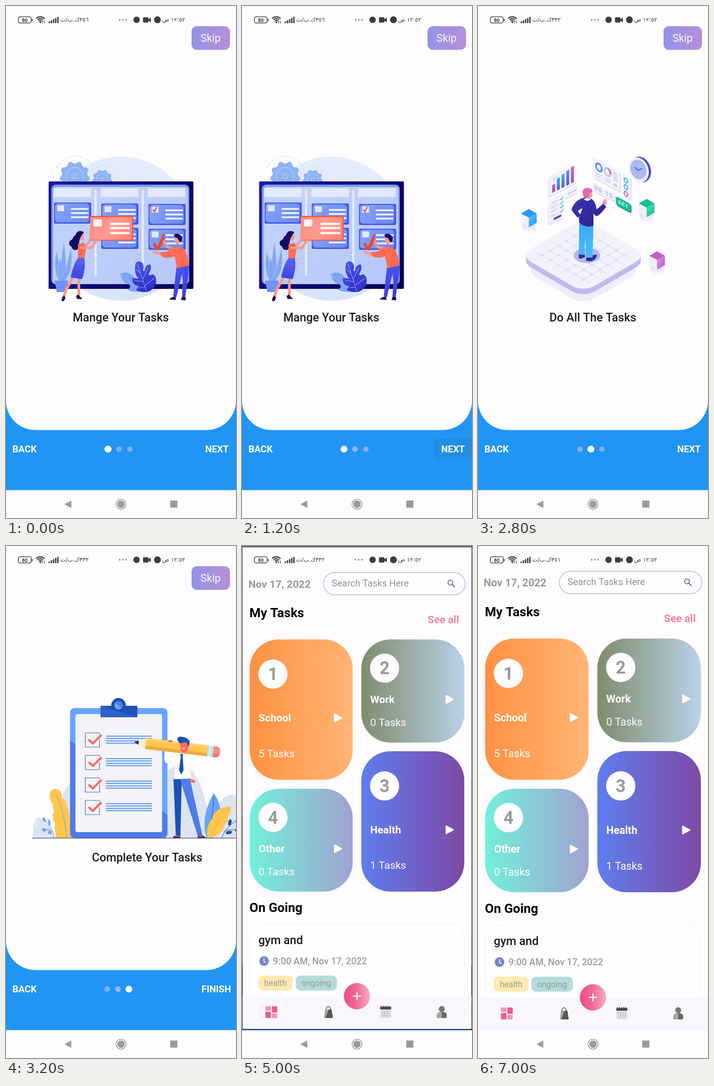
Recreate the animation shown at these times as an HTML page with a canvas. Size 502 px wide and 1115 px high, loop 7.1 s.

```html
<!DOCTYPE html>
<html lang="en">
<head>
<meta charset="utf-8">
<title>Task planner</title>
<style>
html, body { margin: 0; width: 502px; height: 1115px; overflow: hidden; background: #fefcff; }
canvas { display: block; width: 502px; height: 1115px; }
</style>
</head>
<body>
<canvas id="stage"></canvas>
<script>
const W = 502, H = 1115, FOOT = 1054.5, LOOP = 7100, BG = '#fefcff', BLUE = '#2095f4';
const cv = document.getElementById('stage'), c = cv.getContext('2d');
const dpr = window.devicePixelRatio || 1;
cv.width = W * dpr;
cv.height = H * dpr;

// ---------- helpers ----------
const clamp = v => Math.max(0, Math.min(1, v));
const ramp = (t, a, b) => clamp((t - a) / (b - a));
function bezier(x1, y1, x2, y2) {
  const at = (a, b, u) => 3 * a * u * (1 - u) ** 2 + 3 * b * u * u * (1 - u) + u ** 3;
  return x => {
    if (x <= 0) return 0;
    if (x >= 1) return 1;
    let lo = 0, hi = 1;
    for (let i = 0; i < 24; i++) {
      const m = (lo + hi) / 2;
      if (at(x1, x2, m) < x) lo = m; else hi = m;
    }
    return at(y1, y2, lo);
  };
}
function grad(x0, y0, x1, y1, ...cols) {
  const g = c.createLinearGradient(x0, y0, x1, y1);
  cols.forEach((k, i) => g.addColorStop(i / (cols.length - 1), k));
  return g;
}
function paint(p, fill, line, w) {
  if (fill) { c.fillStyle = fill; c.fill(p); }
  if (line) { c.strokeStyle = line; c.lineWidth = w || 1; c.stroke(p); }
}
const path = (d, fill, line, w) => paint(new Path2D(d), fill, line, w);
function box(x, y, w, h, r, fill, line, lw) {
  const p = new Path2D();
  p.roundRect(x, y, w, h, r);
  paint(p, fill, line, lw);
}
function oval(x, y, rx, ry, fill, line, w, rot = 0) {
  const p = new Path2D();
  p.ellipse(x, y, rx, ry, rot, 0, 7);
  paint(p, fill, line, w);
}
const disc = (x, y, r, fill, line, w) => oval(x, y, r, r, fill, line, w);
function text(s, x, y, size, weight, color, align = 'left') {
  c.font = `${weight} ${size}px Roboto, sans-serif`;
  c.textAlign = align;
  c.fillStyle = color;
  c.fillText(s, x, y);
}
function within(m, draw) {
  c.save();
  c.transform(...m);
  draw();
  c.restore();
}
function each(list, draw) { list.forEach((a, i) => draw(...[].concat(a), i)); }

// ---------- page 1: board ----------
function gear(x, y, r, n) {
  c.save();
  c.setLineDash([5, 4]);
  c.strokeStyle = '#d3e0f9';
  c.lineWidth = 2;
  c.beginPath();
  c.arc(x, y, r * 1.33, -2.7, .1);
  c.stroke();
  c.restore();
  c.beginPath();
  for (let i = 0; i < 4 * n; i++) {
    const a = (i + .5) / (4 * n) * Math.PI * 2, q = i % 4 < 2 ? r : r * .85;
    c.lineTo(x + q * Math.cos(a), y + q * Math.sin(a));
  }
  c.fillStyle = '#8fb2f5';
  c.fill();
  disc(x, y, r * .58, null, '#bdd2fa', 1.2);
  disc(x, y, r * .16, '#8fb2f5', '#bdd2fa', 1.2);
}
function ticket(x, y) {
  box(x, y, 81, 46, 3, '#4456ec');
  box(x + 2, y + 2, 75, 41, 7, grad(x, y, x + 75, y + 41, '#86a2f7', '#6c8bf3'));
  box(x + 7, y + 6, 15, 13, 0, '#dfe8fd');
  for (let i = 0; i < 3; i++) box(x + 37, y + 12 + i * 9, 38, 4, 0, '#e9effe');
}
function boardPage() {
  const skin = '#ff9687', red = '#ff6b55', navy = '#120c66', leaf = '#7fa1f3';
  disc(251, 485, 157, grad(251, 328, 251, 642, '#e5edfb', '#d8e4fb'));
  c.save();
  c.beginPath();
  c.rect(93, 320, 316, 64);
  c.clip();
  gear(150, 371, 33, 9);
  gear(210, 378, 22, 9);
  c.restore();
  box(93, 382, 316, 234, 2, grad(93, 382, 409, 616, '#211a9c', '#0f0875', '#06034f'));
  box(99, 389, 301, 217, 9, '#7b9df3');
  box(103, 394, 294, 211, 7, grad(103, 394, 396, 605, '#c3d3fa', '#b6c8f8'));
  each([104, 207, 309], x => box(x, 397, 82, 19, 0, '#e2eafc'));
  each([193, 296], x => box(x, 400, 5, 187, 0, '#e2eafc'));
  each([[105, 428], [208, 430], [208, 483], [311, 431], [311, 485]], ticket);
  path('M320 443L324 448L329 438', null, '#e8492f', 2.5);

  // potted plant
  each([[110, 535], [126, 514], [118, 550], [141, 528], [139, 562]], (x, y) =>
    path(`M${x} ${y}Q${x - 8} 575 117 602H126Q${x + 9} 570 ${x} ${y}`, '#80a5f4', '#a9c3f8', .7));
  path('M106 598H136L130 623H111Z', '#7094f2');

  // coral card
  box(184, 457, 94, 54, 2, '#f25c4b');
  box(184, 460, 91, 49, 2, grad(184, 458, 275, 510, '#ff8c80', '#ff9b8f', '#ff7f71'));
  box(191, 465, 18, 15, 0, '#fff6f5');
  each([472, 481, 492], y => box(227, y, 43, 5, 0, '#fff3f1'));

  // woman
  c.lineCap = c.lineJoin = 'round';
  path('M147 590L131 618L126 634M159 592V632', null, skin, 6);
  path('M172 525L184 510L185 484', null, skin, 4.5);
  oval(165, 502, 5, 9, skin);
  path('M170 493C164 487 153 490 152 499C146 501 147 507 143 509C136 512 136 521 143 524C144 531 153 534 157 529C161 524 158 518 160 513C161 508 162 502 170 493Z', navy);
  path('M157 519L170 515L175 527L171 551H157Z', red);
  path('M164 526L187 527L198 509', null, skin, 5.5);
  path('M157 549H171Q175 570 166 595L141 591Q147 562 157 549Z', grad(157, 549, 157, 595, '#5a64f2', '#3d43de'));
  path('M121 642Q122 633 127 631L130 636L126 643ZM153 632L157 628L167 638H160L155 638Z', navy);

  // leaves
  path('M249 584Q262 576 276 586L284 600L300 622Q272 624 266 617Q275 612 268 606Q255 604 249 584Z', leaf);
  path('M250 585L290 618', null, '#b4c8fa', 1);
  path('M283 560Q290 552 298 560Q302 566 299 576L302 578Q304 562 315 563Q319 572 311 584L314 587Q322 580 327 592Q330 606 321 615Q314 622 310 622Q294 625 284 618L290 610Q274 608 276 592L290 594Q278 582 283 560Z', grad(285, 555, 315, 622, '#4c55ee', '#2e2cc4'));
  path('M287 562L306 620M294 582L284 574M299 600L281 598M303 612L290 614M299 594L310 570M304 608L323 593', null, '#8fa6f8', 1.1);

  // man
  path('M366 529L352 525L345 513M338 541L323 535', null, skin, 5.5);
  path('M320 517Q327 513 330 525L343 496L347 498Q342 522 332 533Q325 530 320 517Z', '#e8492f');
  path('M372 569L400 565L397 595L391 634H384L386 597L384 583L372 634L365 632Z', grad(370, 566, 395, 634, '#4a54ee', '#3b3fd8'));
  oval(374, 510, 6.5, 9, skin);
  path('M366 499Q372 493 379 498Q387 502 384 511Q381 517 378 512L374 505Q369 505 366 499Z', navy);
  path('M361 528Q372 522 384 526Q394 530 400 565L373 571L368 545Q355 551 341 546L335 536Q350 538 361 528Z', red);
  path('M356 639Q362 632 370 633L371 640ZM382 640L384 634H392V641Z', navy);
}

// ---------- page 2: control room ----------
function slab(dy, half, r, fill, line) {
  within([1, .58, -1, .58, 230, 543 + dy], () => box(-half, -half, half * 2, half * 2, r, fill, line));
}
function panel(x, y, k, w, h, draw, face = '#f1f2fc', edge = '#d9dbf4') {
  within([1, k, 0, 1, x, y], () => {
    box(k > 0 ? 2 : -1, 2, w, h, 4, edge);
    box(0, 0, w, h, 4, face);
    draw();
  });
}
function wideText(s, x, y, size, color) {
  c.letterSpacing = '1.5px';
  text(s, x, y, size, 700, color, 'center');
  c.letterSpacing = '0px';
}
function cube(x, y, top, side) {
  box(x - 14, y + 8, 28, 28, 2, grad(0, y + 14, 0, y + 36, '#dddcf5', 'rgba(240,240,252,0)'));
  path(`M${x - 17} ${y - 10}L${x} ${y - 1}V${y + 20}L${x - 17} ${y + 10}Z`, '#f0effb');
  path(`M${x + 17} ${y - 10}L${x} ${y - 1}V${y + 20}L${x + 17} ${y + 10}Z`, grad(x, y, x + 17, y + 15, side, top));
  path(`M${x} ${y - 20}L${x + 17} ${y - 10}L${x} ${y - 1}L${x - 17} ${y - 10}Z`, top);
}
function roomPage() {
  const pink = '#d466ad', cyan = '#3aaef6', violet = '#6257cf', teal = '#19bd98', pale = '#c4c7ea';
  slab(34, 64, 24, '#eeedfb');
  for (let i = 12; i > 0; i--) slab(i, 69.5, 24, '#bebbef');
  slab(0, 69.5, 24, '#f2f2fc');
  within([1, .58, -1, .58, 230, 543], () => {
    for (let i = -2.5; i < 3; i++) {
      box(i * 18 - .6, -60, 1.2, 120, 0, '#e1e2f4');
      box(-60, i * 18 - .6, 120, 1.2, 0, '#e1e2f4');
      for (let j = -2.5; j < 3; j++) disc(i * 18, j * 18, 2.8, '#dcddf3');
    }
  });
  oval(238, 543, 29, 17, '#b7b7e8');

  panel(154, 372, -.5, 61, 44, () => {
    each([[17, pink], [26, cyan], [29, cyan], [32, '#5c8be9'], [35, pink]], (h, col, i) =>
      box(8 + i * 10.2, 39 - h, 6.5, h, 0, grad(0, 39 - h, 0, 39, col, i % 4 ? violet : '#8d5bc9')));
    box(9, 8, 10, 1.5, 0, pale);
    box(9, 12, 8, 1.5, 0, pale);
  });
  panel(154, 423, -.48, 34, 53, () => {
    for (let i = 0; i < 4; i++) {
      box(5, 9 + i * 9, 18, 1.5, 0, pale);
      box(5, 12 + i * 9, 12, 1, 0, pale);
      path(`M26 ${10 + i * 9}l2 2l4 -5`, null, teal, 1.5);
    }
    box(11, 44, 17, 5, 2, '#574bbd');
  });
  panel(192, 403, -.52, 26, 16, () => { for (let i = 0; i < 4; i++) disc(6 + i * 5, 9, 1.6, '#b1b4e2'); });
  panel(250, 327, .54, 60, 45, () => {
    oval(14, 17, 6.5, 8, null, '#7b77d5', 3.5);
    path('M14 9Q21 11 20 18Q19 24 14 25', null, cyan, 4);
    oval(33, 17, 6.5, 8, null, '#bfc0ea', 3.5);
    path('M33 9Q40 11 39 18', null, pink, 4);
    for (let i = 0; i < 5; i++) box(46, 10 + i * 4, 8, 1.5, 0, '#b8bbe3');
    each([6, 26], x => { box(x, 32, 15, 1.5, 0, pale); box(x, 37, 12, 1.5, 0, pale); });
    box(46, 34, 8, 5, 1, '#c8caed');
  });
  panel(250, 383, .53, 48, 18, () => wideText('08:15', 24.5, 13.5, 13, '#b2b5df'));
  panel(301, 414, .53, 32, 18, () => wideText('SET', 16.5, 13, 10.5, '#e5fff7'), '#18c096', '#0f9d7c');
  panel(315, 363, .5, 18, 50, () =>
    each([teal, cyan, '#b15bc6'], (col, i) => oval(8, 13 + i * 14.5, 4, 5, '#e1e5f9', col, 2)));

  oval(357, 356, 22, 30, '#e3e4f8', null, 0, -.35);
  oval(355, 356, 21.5, 28.5, '#4a3fc0', null, 0, -.35);
  oval(351, 357, 21, 28, '#eceefb', null, 0, -.35);
  oval(350, 356, 17, 22, '#b0b8ef', null, 0, -.35);
  for (let i = 0; i < 12; i++) disc(350 + 13 * Math.cos(i * .5236), 356 + 17 * Math.sin(i * .5236), .8, '#7f87d2');
  path('M342 351L349 358L358 354', null, '#168fd8', 2.5);

  cube(111, 462, '#2699f1', '#55b9fa');
  cube(368, 440, '#15bd93', '#40dcb5');
  cube(391, 554, '#c45fc5', '#dc86d9');

  // man
  path('M220 541L232 538L234 546Q226 552 220 549ZM236 548L250 543L259 541Q260 552 246 556L236 555Z', '#352a9d');
  path('M221 470Q237 485 252 476L250 548H236L234 505L232 542L220 541Z', grad(220, 475, 252, 545, '#38a8f5', '#4abdfb'));
  path('M270 433Q273 423 277 420L280 421L281 430L276 436Z', '#f59b9f');
  path('M222 421Q233 414 246 419Q256 424 259 443L273 431L280 437Q266 456 258 458L252 452V478Q237 485 221 472L220 462L228 440L218 446L224 456L218 461Q207 450 204 443Q210 427 222 421Z', grad(205, 420, 260, 480, '#4035b5', '#2c218f'));
  path('M234 413H247V421Q240 425 234 419Z', '#f3a0ad');
  oval(245, 410, 5, 8, '#f5a0a4');
  path('M228 405Q229 396 239 396Q250 397 250 404L244 407L241 416Q236 420 232 417Q229 413 228 405Z', grad(228, 398, 248, 418, '#ee6e9e', '#c969c3'));
  path('M230 421Q238 417 246 421L239 425Z', '#eef0ff');
}

// ---------- page 3: checklist ----------
function sprig(x, s, col) {
  within([s, 0, 0, 1, x, 636], () => {
    path('M0 0Q8 -24 36 -40M6 -14Q16 -20 34 -18', null, '#25458f', 1);
    each([[36, -40, -.7], [18, -34, -1.3], [36, -18, -.2], [16, -12, -.2]], (a, b, r) => oval(a, b, 7, 3.6, col, null, 0, r));
  });
}
function listPage() {
  const hill = '#dce4f0', navy = '#1b51b4', mid = '#4f7ce8', sky = '#68a5ff', gold = '#ffc64f', coral = '#ff6b63';
  path('M0 636Q2 591 14 591Q24 592 30 605Q38 608 47 636ZM50 636Q60 520 88 515V636ZM284 636V500Q310 470 340 480Q370 510 378 560Q390 580 394 600Q408 542 436 541Q456 541 465 575Q470 598 482 610L500 636Z', hill);
  sprig(48, -.62, sky);
  path('M52 636Q47 612 50 604Q40 590 48 577Q42 568 46 564Q36 554 38 538Q42 524 59 532Q66 538 64 548Q76 556 75 566Q80 572 79 582L88 596V636Z', gold);
  path('M51 540Q68 570 75 634', null, '#75a5dd', 1.2);

  // clipboard
  c.save();
  c.beginPath();
  c.roundRect(82, 353, 213, 283, 10);
  c.clip();
  box(82, 353, 213, 283, 0, sky);
  path('M82 423L295 586V636H82Z', mid);
  c.restore();
  box(94, 366, 189, 257, 4, '#f4f3f8');
  disc(188, 347, 16, navy);
  box(149, 348, 80, 25, 0, navy);
  path('M149 348L229 373H149Z', '#2a62c5');
  disc(188, 347, 9.2, sky);
  path('M181.5 340.5A9.2 9.2 0 0 1 194.5 353.5Z', mid);
  c.lineCap = 'butt';
  c.lineJoin = 'miter';
  for (let i = 0; i < 4; i++) {
    const y = 407 + i * 49;
    box(115.5, y, 31, 31, 0, null, '#2c5fae', 1.2);
    for (let j = 0; j < 4; j++) box(160, y + 6 + j * 5.1, 101, 2.2, 1, '#5b98ee');
    path(`M123 ${y + 15}L132 ${y + 23}L151 ${y + 4}`, null, '#f4f3f8', 9);
    path(`M122.5 ${y + 14.5}L132 ${y + 23}L151 ${y + 4}`, null, coral, 4.8);
  }

  // man
  path('M308 507H326L323 631H313Z', navy);
  path('M322 507H344L371 630L361 632Z', mid);
  path('M306 636Q309 630 323 631V636ZM360 636L362 630L370 629L380 636Z', '#24336b');
  path('M306 633Q310 629 322 631V633ZM362 631L370 629L374 632L364 634Z', '#d94e55');
  path('M344 497L345 507L355 511Q358 515 351 516L344 513L340 503Z', coral);
  path('M289 447L300 448L299 460L312 452Q327 445 338 455L345 492L346 506L309 508L312 470L292 473Q286 470 289 447Z', '#fff');
  path('M312 470L309 507M299 460L306 457', null, '#dfe5f0', 1);
  path('M322 453H329L328 458L330 488L325 498L320 488L324 458Z', navy);

  // pencil
  const a = .118;
  within([Math.cos(a), Math.sin(a), -Math.sin(a), Math.cos(a), 222, 427], () => {
    path('M0 0L27 -12V12Z', '#fbeccb');
    path('M0 0L10 -4.5V4.5Z', '#252b56');
    box(26, -12, 136, 24, 0, gold);
    box(26, 5, 136, 7, 0, '#eda943');
    box(26, -12, 136, 5, 0, '#ffd36b');
    box(161, -12, 14, 24, 0, '#bfe0f0');
    box(165, -12, 3, 24, 0, '#dceff8');
    box(174, -12, 15, 24, [0, 9, 9, 0], '#f98c7c');
    box(174, 4, 14, 8, [0, 0, 8, 0], '#ec786c');
  });
  oval(301, 425, 5, 2.5, coral);
  path('M321 427Q331 420 342 426L340 443Q332 456 324 445Z', coral);
  path('M317 424Q314 416 323 415Q337 416 342 423Q345 430 340 437L337 428Q327 427 323 431Z', navy);
  path('M325 439Q331 442 334 438Q331 446 325 439Z', '#fff');

  // plants
  path('M380 636Q366 590 396 538Q418 570 408 606L394 636Z', sky);
  path('M396 545Q394 590 384 632', null, navy, 1);
  path('M382 636Q378 610 392 594Q396 570 433 567Q434 580 427 590Q428 602 418 608Q418 622 404 628Q398 636 382 636Z', gold);
  path('M430 571Q402 600 388 634', null, '#e3a43c', 1);
  sprig(413, 1, navy);
  box(0, 635.5, W, 1.2, 0, '#3c466f');
}

// ---------- screens ----------
const pages = [[boardPage, 'Mange Your Tasks'], [roomPage, 'Do All The Tasks'], [listPage, 'Complete Your Tasks']];
const glide = bezier(.42, 0, .58, 1);

function intro(t) {
  const pos = glide(ramp(t, 1085, 1585)) + glide(ramp(t, 2819, 3319));
  const last = pos > 1.5;
  box(0, 0, W, FOOT, 0, BLUE);
  box(0, 0, W, 923.4, [0, 0, 64, 64], BG);
  pages.forEach(([draw, title], i) => {
    const x = (i - pos) * W;
    if (Math.abs(x) >= W) return;
    within([1, 0, 0, 1, x, 0], () => {
      draw();
      text(title, 250.5, 686.8, 25.4, 500, '#1c1b1f', 'center');
    });
  });
  box(405, 44, 84, 51.5, 12, grad(405, 0, 489, 0, '#9294e8', '#b78fd8'));
  text('Skip', 446.5, 78, 23, 400, '#fdfaff', 'center');

  const press = Math.max(...[1040, 2780, 4720].map(s => ramp(t, s, s + 80) * (1 - ramp(t, s + 180, s + 330))));
  if (press > 0) box(last ? 412 : 420, 942, 90, 46, 3, `rgba(60,90,120,${.12 * press})`);
  text('BACK', 14, 972, 20.4, 700, '#fff');
  text(last ? 'FINISH' : 'NEXT', last ? 459 : 460.5, 972, 20.4, 700, '#fff', 'center');
  for (let i = 0; i < 3; i++) {
    const on = clamp(1 - Math.abs(pos - i));
    const x = last ? 221 + i * 23.6 : 222.7 + i * 23.8;
    disc(x, 965, 6 + 1.6 * on, `rgb(${132 + 123 * on},${174 + 81 * on},${251 + 4 * on})`);
  }
}

function card(n, title, count, x, y, h, dy, cols) {
  box(x, y, 226, h, 64, grad(x, 0, x + 226, 0, ...cols));
  disc(x + 51, y + dy, 32, BG);
  text(n, x + 51, y + dy + 13.5, 38.3, 700, '#9b9a9b', 'center');
  const mid = y + (h > 250 ? 172 : 131.5);
  text(title, x + 19.5, mid + 8, 23, 700, '#fff');
  text(count + ' Tasks', x + 19.5, mid + (h > 250 ? 86 : 58), 23, 400, '#fdfbff');
  c.lineJoin = 'round';
  path(`M${x + 186.5} ${mid - 8}V${mid + 8}L${x + 201.5} ${mid}Z`, '#fff', '#fff', 3);
}
function home() {
  const grey = '#9a999d', pink = '#ee5d89', soft = '#f596b3';
  box(0, 0, W, FOOT, 0, BG);
  text('Nov 17, 2022', 12.5, 88, 23, 700, grey);
  box(177.5, 55, 311, 49, 24.5, '#fffdff', '#c8c3e7', 2);
  text('Search Tasks Here', 195.5, 85, 20.4, 400, '#929196');
  c.lineCap = 'butt';
  disc(456, 77, 5.3, null, '#727176', 2);
  path('M460 81L466 87', null, '#727176', 2.4);
  text('My Tasks', 15, 153, 28.1, 700, '#050505');
  text('See all', 406, 166, 23, 700, '#f285a9');
  card('1', 'School', 5, 15.5, 201.5, 307.5, 76, ['#ff9142', '#ffb575']);
  card('2', 'Work', 0, 260.5, 201.5, 226, 63, ['#7f8c6d', '#bad1e8']);
  card('3', 'Health', 1, 260.5, 446.5, 307.5, 76, ['#5f7df0', '#7d4aa4']);
  card('4', 'Other', 0, 15.5, 528.5, 225.5, 63, ['#72f0d9', '#a0a2d1']);
  text('On Going', 15, 798.5, 28.1, 700, '#050505');

  box(15.5, 825.5, 471, 200, 28, '#fefdff', '#f2eff4', 1);
  text('gym and', 34.5, 869, 25.5, 500, '#1c1b1f');
  disc(47, 906, 10.5, '#7886cb');
  path('M47 900V907L51 910', null, '#fff', 1.8);
  text('9:00 AM, Nov 17, 2022', 66.5, 913, 20.4, 500, grey);
  box(34.5, 938, 75.5, 32.5, 10, '#ffe9ad');
  box(116.5, 938, 90.5, 32.5, 10, '#b2dcda');
  text('health', 72, 961, 17.9, 400, grey, 'center');
  text('ongoing', 161.5, 961, 17.9, 400, grey, 'center');

  box(0, 983, W, FOOT - 983, 0, '#f9f7fb');
  box(50, 1005, 12, 10, 2, soft);
  box(50, 1017, 12, 14, 2, pink);
  box(64, 1005, 12, 14, 2, pink);
  box(64, 1021, 12, 10, 2, soft);
  path('M183 1014V1010Q188 1001 193 1010V1014', null, '#565656', 1.6);
  path('M181 1012H195L198 1031H179Z', '#a2a2a2');
  path('M189 1012H195L198 1031H182Z', '#565656');
  box(302, 1008, 24, 23, 2, '#e1e0e3');
  box(302, 1006, 24, 6, 1, '#4a494c');
  for (let i = 0; i < 5; i++) box(304 + i * 4.5, 1004, 1.6, 4, 0, '#4a494c');
  for (let i = 0; i < 12; i++) disc(307 + i % 4 * 4.7, 1017 + (i >> 2) * 4.5, 1.1, '#9b9a9d');
  disc(437, 1011, 6.5, '#747474');
  path('M426 1031V1024Q427 1017 437 1017V1031Z', '#a5a5a5');
  path('M437 1031V1017Q448 1017 448 1025V1029L446 1031Z', '#686868');
  disc(251, 983, 28.7, grad(222, 983, 280, 983, '#ea4c80', '#ef6c97', '#f7aec7'));
  path('M251 974V992M242 983H260', null, '#fff', 2.4);
}

const zoomA = bezier(.05, 0, .1333, .06), zoomB = bezier(.2083, .82, .25, 1);
function zoomEase(p) {
  return p < 1 / 6 ? .4 * zoomA(p * 6) : .4 + .6 * zoomB((p - 1 / 6) * 1.2);
}
function scaled(s, draw) {
  within([s, 0, 0, s, W / 2 * (1 - s), FOOT / 2 * (1 - s)], draw);
}

function statusBar(t) {
  const ink = '#3d3c40';
  box(27, 23.5, 28, 13.5, 4, null, ink, 1.6);
  box(56.5, 28, 1.8, 5, 1, ink);
  text('80', 41, 34.5, 11, 700, ink, 'center');
  c.lineCap = 'butt';
  c.strokeStyle = ink;
  c.lineWidth = 2.3;
  each([4.5, 8.5, 12.5], r => {
    c.beginPath();
    c.arc(75, 36, r, -2.4, -.74);
    c.stroke();
  });
  disc(75, 35.5, 2, ink);
  path('M80 32V38M84 32V38', null, ink, 1.3);
  for (let i = 0; i < 5; i++) box(93 + i * 4.7, 33.5 - i * 2.5, 3, 4 + i * 2.5, 1, ink);
  each([248, 255, 262], x => disc(x, 30, 1.3, ink));
  disc(285, 30, 7, ink);
  box(299, 24.5, 12, 11.5, 2, ink);
  path('M311 29L316 25V35.5L311 32Z', ink);
  disc(330.5, 30, 7.5, ink);
  c.save();
  c.direction = 'rtl';
  c.textAlign = 'right';
  c.fillStyle = ink;
  c.font = '12.5px "DejaVu Sans", "Noto Sans", sans-serif';
  const rate = t < 2500 ? '٣٥٦' : t < 6000 ? '٣٣٢' : '٣٤١';
  c.fillText(rate + 'ك.ب/ث', 180.5, 34);
  c.fillText('١٢:٥٢ ص', 391, 34);
  c.restore();
}
function navBar() {
  const grey = '#9a999b';
  box(0, FOOT, W, H - FOOT, 0, BG);
  path('M142.5 1077V1093L127.5 1085Z', grey);
  disc(251, 1085, 10.8, null, grey, 1.6);
  disc(251, 1085, 8, grey);
  box(358.5, 1077, 15.5, 15.5, 0, grey);
}

function render(t) {
  c.setTransform(dpr, 0, 0, dpr, 0, 0);
  box(0, 0, W, H, 0, BG);
  const p = ramp(t, 4830, 5130), z = zoomEase(p);
  if (p < 1) scaled(1 + .05 * z, () => intro(t));
  if (p > 0) {
    if (p < 1) box(0, 0, W, FOOT, 0, `rgba(0,0,0,${.6 * ramp(p, .2075, .4175)})`);
    c.globalAlpha = ramp(p, .125, .25);
    if (c.globalAlpha > 0) scaled(.85 + .15 * z, home);
    c.globalAlpha = 1;
  }
  statusBar(t);
  navBar();
}

const start = performance.now();
function tick() {
  render((performance.now() - start) % LOOP);
  requestAnimationFrame(tick);
}
tick();
</script>
</body>
</html>
```
